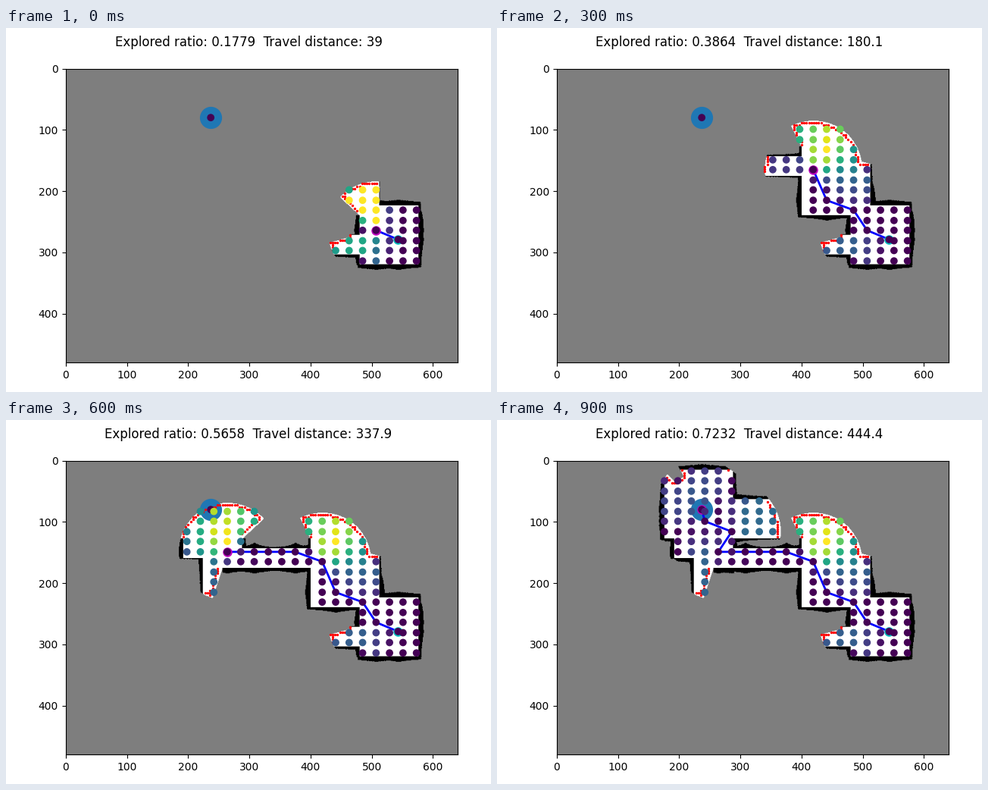
Write a matplotlib script that moves like this. It is 640x480 px and loops after 1 s.

```python
import math

import matplotlib.pyplot as plt
import numpy as np
from matplotlib.animation import FuncAnimation

WIDTH, HEIGHT, CELL = 640, 480, 4
SENSOR_RANGE, VIEW_RANGE, WALL_DEPTH = 80, 70, 10
WALL, UNKNOWN, FREE = 1, 127, 255

START, GOAL = (543, 279), (237, 80)
ROUTE = [START, (507, 264), (485, 231), (441, 215), (419, 165), (375, 149),
         (308, 149), (264, 149), (286, 116), (242, 99), GOAL]

# The floor plan is laid out in square tiles; rooms are x0, x1, y0, y1
TILE = 16
FLOOR_AREA = 275 * TILE ** 2
ROOMS = [
    (30, 36, 14, 20),
    (24, 30, 17, 19),
    (25, 32, 4, 15),
    (14, 25, 9, 11),
    (18, 25, 4, 8),
    (11, 18, 1, 8),
    (12, 18, 8, 10),
    (14, 16, 10, 16),
]
PILLAR = (234, 76)


def build_floor():
    floor = np.full((HEIGHT, WIDTH), WALL)
    for room in ROOMS:
        x0, x1, y0, y1 = (TILE * edge for edge in room)
        floor[y0:y1, x0:x1] = FREE
    floor[PILLAR[1], PILLAR[0]] = WALL
    return floor.tolist()


def grid_line(x, y, x1, y1):
    """Yield 4-connected cells from (x, y) up to, not including, (x1, y1)."""
    dx, dy = abs(x1 - x), abs(y1 - y)
    step_x = 1 if x1 > x else -1
    step_y = 1 if y1 > y else -1
    error = dx - dy
    while (x, y) != (x1, y1) and 0 <= x < WIDTH and 0 <= y < HEIGHT:
        yield x, y
        if error > 0:
            x += step_x
            error -= 2 * dy
        else:
            y += step_y
            error += 2 * dx


def sense(position, floor, belief):
    """Cast rays that uncover free space and a little of the first wall hit."""
    px, py = position
    for i in range(720):
        angle = math.radians(i / 2)
        end_x = round(px + SENSOR_RANGE * math.cos(angle))
        end_y = round(py + SENSOR_RANGE * math.sin(angle))
        hits = 0
        for x, y in grid_line(px, py, end_x, end_y):
            value = floor[y][x]
            if value == WALL:
                hits += 1
                if hits >= WALL_DEPTH:
                    break
            elif hits:
                break
            belief[y][x] = value


def find_frontiers(belief):
    """Free coarse cells that border on unknown ones."""
    rows, cols = HEIGHT // CELL, WIDTH // CELL
    coarse = belief.reshape(rows, CELL, cols, CELL).min(axis=(1, 3))
    unknown = np.pad((coarse == UNKNOWN).astype(int), 1)
    around = sum(unknown[r:r + rows, c:c + cols] for r in range(3) for c in range(3))
    ys, xs = np.nonzero((coarse == FREE) & (around > 1) & (around < 8))
    return np.column_stack([xs, ys]) * CELL


def utility(node, frontiers, belief):
    """Count the frontier points in clear view of a node."""
    distance = np.hypot(*(frontiers - node).T)
    return sum(
        all(belief[y][x] == FREE for x, y in grid_line(*node, *point))
        for point in frontiers[distance < VIEW_RANGE].tolist())


def explore():
    floor = build_floor()
    belief = [[UNKNOWN] * WIDTH for _ in range(HEIGHT)]
    grid_x = np.linspace(0, WIDTH - 1, 30).round().astype(int).tolist()
    grid_y = np.linspace(0, HEIGHT - 1, 30).round().astype(int).tolist()
    visited = {START}
    sense(START, floor, belief)
    steps = []
    for position in ROUTE[1:]:
        visited.add(position)
        sense(position, floor, belief)
        image = np.array(belief)
        frontiers = find_frontiers(image)
        nodes = [(x, y) for x in grid_x for y in grid_y if belief[y][x] == FREE]
        values = [0 if node in visited else utility(node, frontiers, belief)
                  for node in nodes]
        steps.append((image, frontiers, np.array([GOAL, START] + nodes), [0, 0] + values))
    return steps


STEPS = explore()
fig, ax = plt.subplots(figsize=(6.4, 4.8), dpi=100)
title = fig.suptitle("")


def draw(step):
    image, frontiers, nodes, values = STEPS[step]
    path = ROUTE[:step + 2]
    travelled = sum(math.dist(a, b) for a, b in zip(path, path[1:]))
    explored = np.sum(image == FREE) / FLOOR_AREA

    ax.cla()
    ax.imshow(image, cmap="gray", vmin=WALL, vmax=FREE)
    ax.axis((0, WIDTH, HEIGHT, 0))
    ax.plot(*GOAL, "o", color="C0", markersize=20, zorder=1)
    ax.plot(*zip(*path), "b", linewidth=2)
    ax.plot(*path[-1], "mo", markersize=8)
    ax.plot(*START, "co", markersize=8)
    ax.scatter(*nodes.T, c=values, zorder=5)
    ax.scatter(*frontiers.T, c="r", s=2, zorder=3)
    title.set_text(f"Explored ratio: {explored:.4g}  Travel distance: {travelled:.4g}")
    return []


draw(0)
fig.tight_layout()
animation = FuncAnimation(fig, draw, frames=len(STEPS), interval=100, repeat=True)
plt.show()
```
